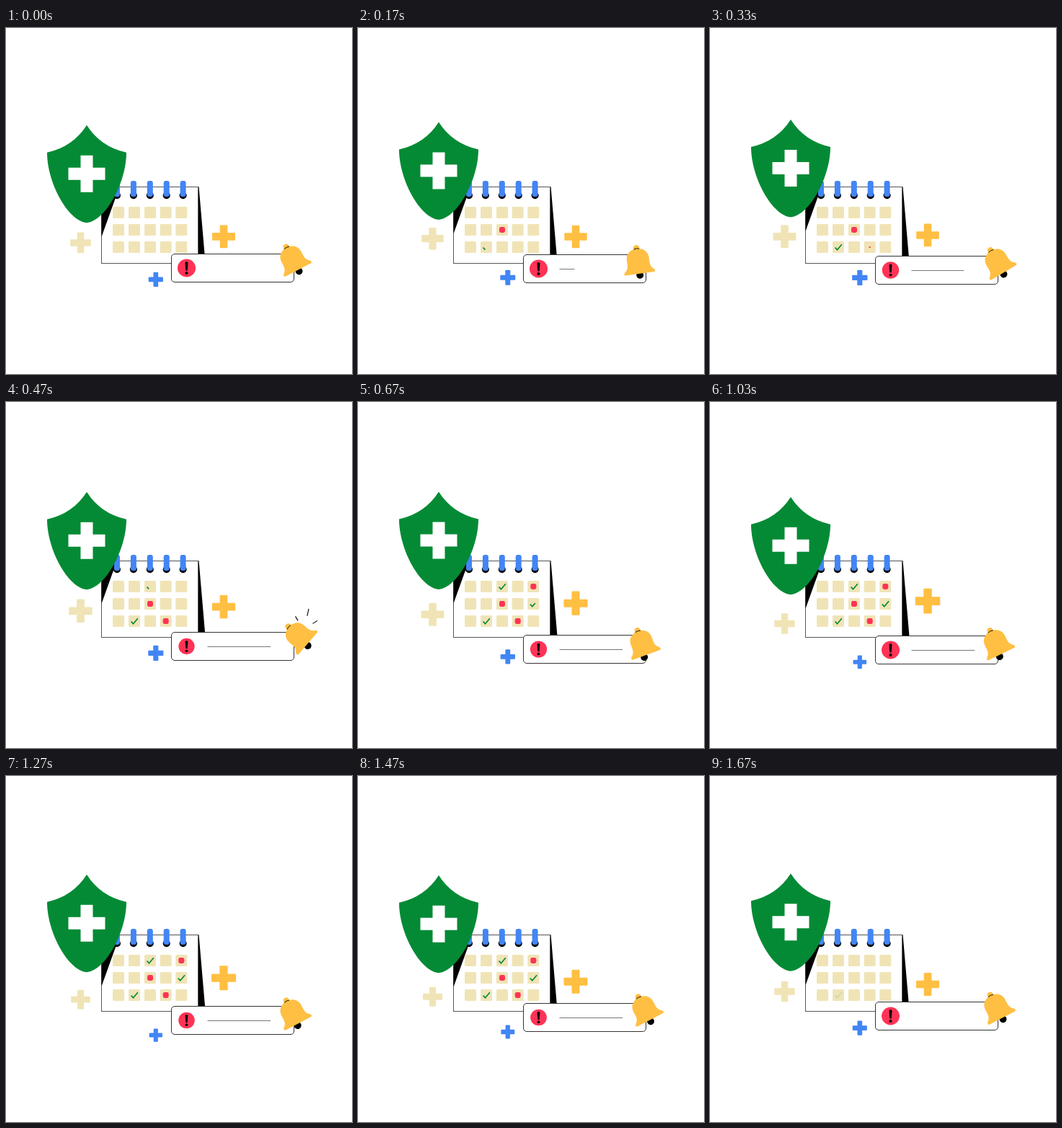
These frames come from a looping animation (480x480 px, 1.7 s). An HTML page with a canvas:

```html
<!DOCTYPE html>
<html lang="en">
<head>
<meta charset="utf-8">
<title>Health calendar reminder</title>
<style>
html, body { margin: 0; width: 100%; height: 100%; overflow: hidden; background: #fff; }
canvas { display: block; width: 480px; height: 480px; }
</style>
</head>
<body>
<canvas id="stage" width="480" height="480"></canvas>
<script>
const ctx = document.getElementById('stage').getContext('2d');
const LOOP = 1700;
const GREEN = '#048a35', RED = '#ff3355', ORANGE = '#ffbf43', BLUE = '#4285f4', TAN = '#f0e4b6', INK = '#000';
const COLS = [156, 178, 200, 221.7, 243.3];
const ROWS = [256, 280, 304];

const clamp = x => Math.max(0, Math.min(1, x));
const ramp = (t, a, b) => clamp((t - a) / (b - a));
const smooth = x => x * x * (3 - 2 * x);
// Smooth wave with its highest value at time `peak`
const wave = (t, mid, amp, peak, period = LOOP) =>
  mid + amp * Math.cos(2 * Math.PI * (t - peak) / period);

function keyed(t, keys) {
  for (let i = 1; i < keys.length; i++) {
    const [t0, v0] = keys[i - 1], [t1, v1] = keys[i];
    if (t <= t1) return v0 + (v1 - v0) * smooth(ramp(t, t0, t1));
  }
  return keys[keys.length - 1][1];
}

function fillRect(x, y, w, h, r, color) {
  ctx.beginPath();
  ctx.roundRect(x, y, w, h, r);
  ctx.fillStyle = color;
  ctx.fill();
}

function disc(x, y, r, color) {
  ctx.beginPath();
  ctx.arc(x, y, r, 0, 2 * Math.PI);
  ctx.fillStyle = color;
  ctx.fill();
}

function poly(points, color) {
  ctx.beginPath();
  points.forEach(([x, y]) => ctx.lineTo(x, y));
  ctx.closePath();
  ctx.fillStyle = color;
  ctx.fill();
}

function plus(x, y, size, color, r = 1) {
  const arm = size / 3;
  fillRect(x - size / 2, y - arm / 2, size, arm, r, color);
  fillRect(x - arm / 2, y - size / 2, arm, size, r, color);
}

function dot(t, x, y, start) {
  const size = 8 * smooth(ramp(t, start, start + 90));
  ctx.globalAlpha = 1 - ramp(t, 1520, 1650);
  if (size > 0) fillRect(x - size / 2, y - size / 2, size, size, size * 0.3, RED);
  ctx.globalAlpha = 1;
}

function check(t, x, y, start, end) {
  const p = ramp(t, start, start + 130);
  if (!p) return;
  const a = ramp(p, 0, 0.4), b = ramp(p, 0.4, 1);
  ctx.globalAlpha = 1 - ramp(t, 1520, end);
  ctx.beginPath();
  ctx.moveTo(x - 4.5, y + 0.5);
  ctx.lineTo(x - 4.5 + 3 * a, y + 0.5 + 3.2 * a);
  if (b) ctx.lineTo(x - 1.5 + 6.3 * b, y + 3.7 - 7.5 * b);
  ctx.strokeStyle = GREEN;
  ctx.lineWidth = 1.7;
  ctx.stroke();
  ctx.globalAlpha = 1;
}

function calendar(t, top) {
  poly([[266, 220], [267.5, 220], [276.7, 327], [266, 327]], INK);
  fillRect(132, 220, 135, 107, 0, '#555');
  fillRect(133, 221, 133, 105, 0, '#fff');
  poly([[132.5, top + 155], [153, top + 98], [153, top + 85], [132.5, top + 85]], INK);

  for (const y of ROWS) for (const x of COLS) fillRect(x - 8, y - 8, 16, 16, 1.5, TAN);

  dot(t, COLS[2], ROWS[1], 60);
  check(t, COLS[1], ROWS[2], 120, 1695);
  dot(t, COLS[3], ROWS[2], 300);
  check(t, COLS[2], ROWS[0], 425, 1650);
  dot(t, COLS[4], ROWS[0], 540);
  check(t, COLS[4], ROWS[1], 570, 1650);

  for (let i = 0; i < 5; i++) {
    const x = 154 + i * 22.9;
    disc(x, 232.3, 5, INK);
    fillRect(x - 4, 212, 8, 22, 3, BLUE);
  }
}

function shield(top) {
  ctx.save();
  ctx.translate(112, top);
  ctx.beginPath();
  ctx.moveTo(0, 0);
  ctx.quadraticCurveTo(19, 30, 55, 38);
  ctx.bezierCurveTo(55, 80, 26, 133, 0, 135.5);
  ctx.bezierCurveTo(-26, 133, -55, 80, -55, 38);
  ctx.quadraticCurveTo(-19, 30, 0, 0);
  ctx.fillStyle = GREEN;
  ctx.fill();
  plus(0, 67.5, 51, '#fff', 0);
  ctx.restore();
}

function banner(t) {
  // Half-pixel steps keep the thin outline sharp
  const y = Math.floor(wave(t, 319.3, 5.9, 870)) + 0.5;
  ctx.beginPath();
  ctx.roundRect(229.5, y, 170, 39, 4.5);
  ctx.fillStyle = '#fff';
  ctx.fill();
  ctx.strokeStyle = '#333';
  ctx.lineWidth = 1;
  ctx.stroke();

  ctx.save();
  ctx.translate(250.5, y + 19.5);
  const s = wave(t, 11.9, 0.8, 85, LOOP / 2) / 12.5;
  ctx.scale(s, s);
  disc(0, 0, 12.5, RED);
  ctx.beginPath();
  ctx.moveTo(-2, -7.5);
  ctx.quadraticCurveTo(0, -10.5, 2, -7.5);
  ctx.lineTo(1.2, 3.5);
  ctx.lineTo(-1.2, 3.5);
  ctx.closePath();
  ctx.fillStyle = INK;
  ctx.fill();
  disc(0, 7, 2, INK);
  ctx.restore();

  const from = 279.5 + 87.5 * smooth(ramp(t, 1480, 1640));
  const to = 279.5 + 87.5 * smooth(ramp(t, 50, 430));
  if (to > from) fillRect(from, y + 19.5, to - from, 1, 0, '#777');
}

function ringMarks(t, y) {
  const p = ramp(t, 390, 460);
  if (!p || t > 610) return;
  ctx.save();
  ctx.translate(0, y);
  ctx.globalAlpha = 1 - ramp(t, 540, 610);
  ctx.strokeStyle = INK;
  ctx.lineWidth = 1.1;
  for (const [x0, y0, x1, y1] of [[405, -6.5, 401.5, -12.5], [417.8, -13, 420, -23], [425.5, -2.5, 432, -6.5]]) {
    ctx.beginPath();
    ctx.moveTo(x0, y0);
    ctx.lineTo(x0 + (x1 - x0) * p, y0 + (y1 - y0) * p);
    ctx.stroke();
  }
  ctx.restore();
}

function bell(t) {
  const angle = keyed(t, [[0, 27.5], [195, 7], [450, 50], [690, 19.5], [980, 26], [1270, 27.8], [1700, 27.5]]);
  const y = wave(t, 308.9, 7.5, 860);
  ringMarks(t, y);
  ctx.save();
  ctx.translate(387.5 + (angle - 27) * 0.09, y);
  ctx.rotate(-angle * Math.PI / 180);
  disc(wave(t, -2, 2.3, 0), 40.5, 5, INK);
  disc(0, 2.5, 4, ORANGE);
  ctx.beginPath();
  ctx.moveTo(-20, 38.5);
  ctx.quadraticCurveTo(-23, 37.5, -20.5, 34.5);
  ctx.bezierCurveTo(-14.5, 30, -15.5, 25, -15.5, 18);
  ctx.bezierCurveTo(-15.5, 9, -8.5, 3.5, 0, 3.5);
  ctx.bezierCurveTo(8.5, 3.5, 15.5, 9, 15.5, 18);
  ctx.bezierCurveTo(15.5, 25, 14.5, 30, 20.5, 34.5);
  ctx.quadraticCurveTo(23, 37.5, 20, 38.5);
  ctx.closePath();
  ctx.fillStyle = ORANGE;
  ctx.fill();
  ctx.beginPath();
  ctx.moveTo(-4, 4);
  ctx.quadraticCurveTo(0, 2.5, 4, 4);
  ctx.strokeStyle = INK;
  ctx.lineWidth = 0.8;
  ctx.stroke();
  ctx.restore();
}

function draw(t) {
  const top = wave(t, 131, 6.8, 1430);
  ctx.fillStyle = '#fff';
  ctx.fillRect(0, 0, 480, 480);
  calendar(t, top);
  shield(top);
  plus(103.5, wave(t, 299.7, 10.5, 1230), wave(t, 29.5, 2.9, 500), TAN);
  plus(302, wave(t, 282.8, 7, 100), wave(t, 33, 1.6, 1050), ORANGE);
  plus(207.8, wave(t, 353.5, 7.5, 1100), wave(t, 19.8, 1.5, 350), BLUE);
  banner(t);
  bell(t);
}

const start = performance.now();
function tick() {
  draw((performance.now() - start) % LOOP);
  requestAnimationFrame(tick);
}
tick();
</script>
</body>
</html>
```
